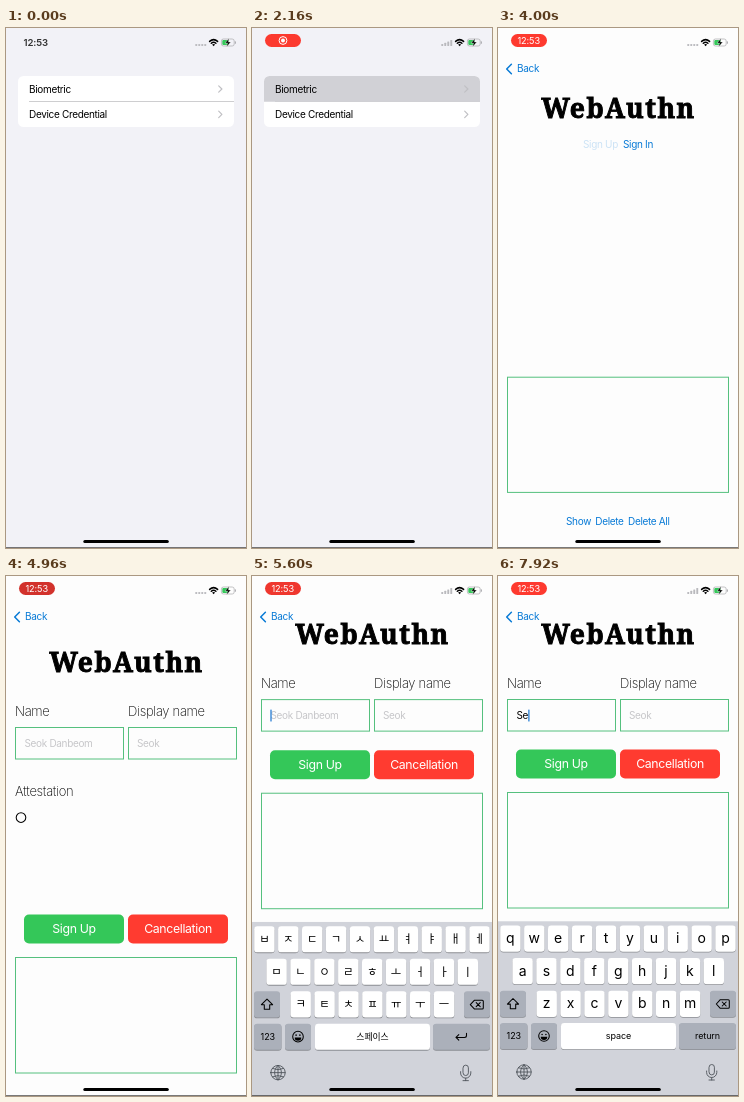
Write an HTML page that moves like this. It is 240 by 520 pixels and loops after 8000 ms.

```html
<!DOCTYPE html>
<html lang="en">
<head>
<meta charset="utf-8">
<title>WebAuthn demo</title>
<style>
html, body { margin: 0; width: 100%; height: 100%; overflow: hidden; background: #f2f2f7; }
svg { display: block; width: 240px; height: 520px; overflow: hidden; }
text { font: 10px Inter, "Noto Sans", sans-serif; letter-spacing: -.33px; white-space: pre; }
.blue { fill: #087ad6; }
.hint { fill: #c6c6c9; }
.label { font-size: 13px; font-weight: 200; letter-spacing: -.3px; }
.btn { font-size: 12.3px; letter-spacing: -.35px; fill: #fff; }
.title { font: 900 26.5px "Noto Serif", serif; letter-spacing: 1.5px; stroke: #000; stroke-width: .9; }
.ko { font: 500 11.4px "Noto Sans CJK KR", "Noto Sans CJK", sans-serif; letter-spacing: 0; }
.en { font-size: 14px; letter-spacing: 0; }
.small { font-size: 9px; letter-spacing: -.1px; }
.line { fill: none; stroke: #000; stroke-width: 1.05; stroke-linecap: round; stroke-linejoin: round; }
.green { fill: #fdfdfd; stroke: #55c07e; stroke-width: 1; }
</style>
</head>
<body>
<svg id="stage" viewBox="0 0 240 520" xmlns="http://www.w3.org/2000/svg"></svg>
<script>
const LOOP = 8000;
const PUSH = 2200, FORM = 4240, KEYS = 5115, ENGLISH = 6640, TYPE_1 = 7280, TYPE_2 = 7760;
const FORM_RISE = 28, LOWER_RISE = 165, KEYBOARD_RISE = 175;
const FULL_NAME = 'Seok Danbeom', SHORT_NAME = 'Seok', TYPED = 'Se';

const rect = (x, y, w, h, fill, r = 0, more = '') =>
  `<rect x="${x}" y="${y}" width="${w}" height="${h}" rx="${r}" fill="${fill}" ${more}/>`;
const text = (x, y, s, cls = '', more = '') =>
  `<text x="${x}" y="${y}" class="${cls}" ${more}>${s}</text>`;
const mid = (x, y, s, cls = '', more = '') => text(x, y, s, cls, `text-anchor="middle" ${more}`);
const path = (d, more = '') => `<path class="line" d="${d}" ${more}/>`;
const group = (id, body, more = '') => `<g id="${id}" ${more}>${body}</g>`;
const frame = (x, y, w, h) => `<rect class="green" x="${x}" y="${y}" width="${w}" height="${h}"/>`;

function listView() {
  const chevron = y => path(`M212.7 ${y - 3.2}l3.2 3.2l-3.2 3.2`, 'style="stroke:#c0c0c4;stroke-width:1.2"');
  return rect(0, 0, 240, 520, '#f2f2f7') +
    rect(12, 48, 216, 51, '#fff', 5.5) +
    rect(23, 73, 205, .8, '#c2c2c5') +
    group('pressed', '<path d="M12 73.8V53.5a5.5 5.5 0 0 1 5.5-5.5h205a5.5 5.5 0 0 1 5.5 5.5v20.3z" fill="#d1d1d6"/>') +
    text(23, 64.6, 'Biometric') + text(23, 90, 'Device Credential') +
    chevron(61) + chevron(86.4) +
    rect(0, 0, 240, 520, '#000', 0, 'id="dim"');
}

function homeView() {
  return group('signUp', text(85, 120, 'Sign Up', 'blue')) +
    text(125, 120, 'Sign In', 'blue') +
    frame(9.5, 349.2, 221, 115.2) +
    text(68, 497, 'Show', 'blue') + text(97.3, 497, 'Delete', 'blue') + text(130, 497, 'Delete All', 'blue');
}

function formView() {
  const fields = text(9, 111.8, 'Name', 'label') + text(122, 111.8, 'Display name', 'label') +
    frame(9.5, 123.5, 108, 31.5) + frame(122.5, 123.5, 108, 31.5) +
    text(18.5, 142.6, FULL_NAME, 'hint', 'id="hint"') +
    text(18.5, 142.6, '', '', 'id="typed"') +
    text(131, 142.6, SHORT_NAME, 'hint') +
    rect(18.4, 133.5, 1.2, 12, '#1673d1', .5, 'id="caret"') +
    text(9, 192, 'Attestation', 'label') +
    '<circle cx="15" cy="213.6" r="4.8" class="line"/>';
  const lower = rect(18, 173.5, 100, 29, '#34c759', 5) + mid(68, 192.4, 'Sign Up', 'btn') +
    rect(122, 173.5, 100, 29, '#ff3b30', 5) + mid(172, 192.4, 'Cancellation', 'btn') +
    frame(9.5, 216.5, 221, 115.5);
  return `<clipPath id="clip"><rect id="clipBox" x="0" width="240"/></clipPath>` +
    `<g clip-path="url(#clip)">${group('fields', fields)}</g>` + group('lower', lower);
}

const ROW_Y = [349.5, 382, 414.7, 447];
const ROW_X = [12.4, 24.6, 48.7];
const keyX = (row, i) => ROW_X[row] + i * 23.9;

function key(x, y, w, fill = '#fff', h = 26.2) {
  return rect(x, y + .8, w, h, '#8b8d92', 3.2) + rect(x, y, w, h, fill, 3.2);
}

function letters(rows, cls) {
  return rows.map((row, r) => [...row].map((c, i) =>
    mid(keyX(r, i), ROW_Y[r] + (cls === 'ko' ? 17 : 17.6), c, cls)).join('')).join('');
}

function keyboard() {
  const grey = '#abb0ba';
  const latin = ['qwertyuiop', 'asdfghjkl', 'zxcvbnm'];
  let s = rect(0, 345.3, 240, 260, '#d1d3da');
  latin.forEach((row, r) => [...row].forEach((c, i) => s += key(keyX(r, i) - 10.2, ROW_Y[r], 20.4)));
  const arrow = 'M15 422.5l-5.6 5.6h2.9v4.6h5.4v-4.6h2.9z';
  s += key(2, ROW_Y[2], 26, grey) + path(arrow) +
    group('shiftOn', rect(2, ROW_Y[2], 26, 26.2, '#fff', 3.2) + path(arrow, 'style="fill:#000"'));
  s += key(212, ROW_Y[2], 26, grey) +
    path('M218.3 428l4-4.3h8a1 1 0 0 1 1 1v6.6a1 1 0 0 1-1 1h-8zM224.2 426l4 4m0-4l-4 4');
  s += key(2, ROW_Y[3], 27.5, grey) + mid(15.8, 463.4, '123', 'small') +
    key(33, ROW_Y[3], 26, grey) +
    '<circle class="line" cx="46" cy="460" r="5.3"/><circle cx="44.1" cy="458.5" r=".8"/><circle cx="47.9" cy="458.5" r=".8"/>' +
    '<path d="M42.7 460.8h6.6a3.3 3.2 0 0 1-6.6 0z"/>' +
    key(63, ROW_Y[3], 115, '#fff') + key(181, ROW_Y[3], 57, grey);
  s += group('korean', letters(['ㅂㅈㄷㄱㅅㅛㅕㅑㅐㅔ', 'ㅁㄴㅇㄹㅎㅗㅓㅏㅣ', 'ㅋㅌㅊㅍㅠㅜㅡ'], 'ko') +
    mid(120.5, 463.3, '스페이스', 'ko', 'style="font-size:8.8px"') +
    path('M214.5 456.6v2.2a2 2 0 0 1-2 2h-8.5m2.8-2.8l-2.8 2.8l2.8 2.8'));
  s += group('english', group('lowerCase', letters(latin, 'en')) +
    group('upperCase', letters(latin.map(r => r.toUpperCase()), 'en')) +
    mid(120.5, 463, 'space', 'small') + mid(209.5, 463, 'return', 'small'));
  const soft = 'style="stroke:#50555c;stroke-width:.9"';
  s += path('M18.8 496a7.2 7.2 0 1 0 14.4 0a7.2 7.2 0 1 0-14.4 0zM26 488.8v14.4M18.8 496h14.4' +
    'M26 488.8c-4.6 4-4.6 10.4 0 14.4M26 488.8c4.6 4 4.6 10.4 0 14.4M20.4 491.8q5.6 2.6 11.2 0M20.4 500.2q5.6-2.6 11.2 0', soft) +
    path('M211 491.2a2.7 2.7 0 0 1 5.4 0v5a2.7 2.7 0 0 1-5.4 0zM208.6 495v1.4a5.1 5.1 0 0 0 10.2 0V495M213.7 501.6v2.4M211 504h5.4', soft);
  return s + popup('popup1', keyX(1, 1), ROW_Y[1], TYPED[0]) + popup('popup2', keyX(0, 2), ROW_Y[0], TYPED[1]);
}

function popup(id, x, y, c) {
  const shape = `M${x - 10.2} ${y + 23}v-20q0-4-3-6t-3-6v-18q0-5 5-5h22.4q5 0 5 5v18q0 4-3 6t-3 6v20q0 3.2-3.2 3.2h-14q-3.2 0-3.2-3.2z`;
  return group(id, `<path d="${shape}" fill="#fff" stroke="#b4b6bb" stroke-width=".5"/>` +
    mid(x, y - 11, c, 'en', 'style="font-size:21px"'));
}

function statusBar() {
  let cell = '', dots = '';
  for (let i = 0; i < 4; i++) {
    cell += rect(189.3 + i * 3, 16 - i * 1.3, 1.9, 2 + i * 1.3, '#b9b9bd', .5);
    dots += rect(189.3 + i * 3, 16, 1.9, 2, '#bcbcc0', .6);
  }
  const wifi = path('M203.6 13.4q4-3.6 8 0M205.3 15.3q2.3-2 4.6 0', 'style="stroke-width:1.5"') +
    '<path d="M206.1 16.6q1.5-1.1 3 0l-1.5 1.7z"/>';
  const battery = rect(215.4, 11, 12.8, 7, 'none', 2, 'stroke="#a9a9ad" stroke-width=".7"') +
    rect(216.3, 11.9, 6.5, 5.2, '#34c759', 1) + rect(228.9, 13.3, 1, 2.5, '#a9a9ad', .5) +
    '<path d="M223.2 10.2l-4.2 4.9h2.5l-1 3.9l4.3-5.1h-2.5z" stroke="#fff" stroke-width=".4"/>';
  return text(17.5, 18, '12:53', '', 'id="clock" style="font-size:9.6px;font-weight:600;fill:#333;letter-spacing:-.1px"') +
    group('pill', rect(13, 6, 36, 13, '#ff3b30', 6.5, 'id="pillBg"') +
      group('recIcon', '<circle cx="31" cy="12.5" r="3.9" fill="none" stroke="#fff" stroke-width="1"/><circle cx="31" cy="12.5" r="2" fill="#fff"/>') +
      mid(30.7, 15.8, '12:53', '', 'id="pillTime" fill="#fff" style="font-size:9.2px;letter-spacing:-.1px"')) +
    group('dots', dots) + group('cell', cell) + wifi + battery;
}

document.getElementById('stage').innerHTML =
  group('list', listView()) +
  group('screen', rect(0, 0, 240, 520, '#fdfdfd') + group('home', homeView()) + group('form', formView()) +
    mid(120.7, 89.6, 'WebAuthn', 'title', 'id="title"')) +
  group('back', path('M13.4 36.2l-4.7 4.8l4.7 4.8', 'style="stroke:#087ad6;stroke-width:1.5"') + text(19, 44.4, 'Back', 'blue')) +
  group('keyboard', keyboard()) +
  group('status', statusBar()) +
  rect(77.3, 512, 85.5, 3, '#000', 1.5) + rect(0, 519.4, 240, .6, '#222');

const el = {};
document.querySelectorAll('[id]').forEach(n => el[n.id] = n);

const clamp = v => Math.max(0, Math.min(1, v));
const ramp = (t, start, length) => clamp((t - start) / length);
// Share of the way still to go in a critically damped move.
const rest = (t, start, speed = 16) => {
  const x = Math.max(0, t - start) / 1000 * speed;
  return (1 + x) * Math.exp(-x);
};
const show = (name, on) => el[name].style.display = on ? '' : 'none';
const move = (name, x, y) => el[name].setAttribute('transform', `translate(${x.toFixed(2)} ${y.toFixed(2)})`);
const fade = (name, v) => el[name].setAttribute('opacity', v.toFixed(3));

function drawStatus(t) {
  fade('clock', 1 - ramp(t, 480, 160));
  fade('pill', ramp(t, 480, 160));
  const glow = .5 + .5 * Math.cos(t / 1000 * Math.PI);
  el.pillBg.setAttribute('fill', `rgb(${210 + 45 * glow | 0},${50 + 9 * glow | 0},${44 + 4 * glow | 0})`);
  const time = ramp(t, 3040, 200);
  fade('recIcon', 1 - time);
  fade('pillTime', time);
  const bars = (t > 1900 && t < 2450) || t > 5400;
  show('cell', bars);
  show('dots', !bars);
}

function drawPush(t) {
  const left = rest(t, PUSH, 15.5);
  show('list', left > .001);
  show('screen', t >= PUSH);
  move('screen', 240 * left, 0);
  move('list', -72 * (1 - left), 0);
  fade('dim', .1 * (1 - left));
  fade('back', ramp(t, PUSH + 80, 240));
  show('pressed', t >= 1740);
  const touch = ramp(t, 3860, 60) - ramp(t, 4140, 100);
  fade('signUp', 1 - .8 * touch);
}

function drawForm(t) {
  const left = rest(t, KEYS + 12);
  const drop = FORM_RISE * left;
  show('home', t < FORM);
  show('form', t >= FORM);
  move('title', 0, t < FORM ? 0 : drop - 22);
  move('fields', 0, drop);
  move('lower', 0, LOWER_RISE * left);
  const top = 95 + drop;
  el.clipBox.setAttribute('y', top);
  el.clipBox.setAttribute('height', 169 + LOWER_RISE * left - top);

  const count = (t >= TYPE_1) + (t >= TYPE_2);
  el.typed.textContent = TYPED.slice(0, count);
  show('hint', !count);
  const since = t - (count === 2 ? TYPE_2 : count ? TYPE_1 : KEYS);
  const phase = since % 1000;
  show('caret', since >= 0);
  fade('caret', phase < 500 ? 1 : 1 - ramp(phase, 500, 120) + ramp(phase, 900, 100));
  el.caret.setAttribute('x', 18.4 + (count ? el.typed.getComputedTextLength() + .3 : 0));
}

function drawKeyboard(t) {
  show('keyboard', t >= KEYS);
  move('keyboard', 0, KEYBOARD_RISE * rest(t, KEYS));
  const english = t >= ENGLISH, caps = english && t < TYPE_1 + 60;
  show('korean', !english);
  show('english', english);
  show('upperCase', caps);
  show('lowerCase', !caps);
  show('shiftOn', caps);
  show('popup1', t >= TYPE_1 - 60 && t < TYPE_1 + 60);
  show('popup2', t >= TYPE_2 - 60 && t < TYPE_2 + 60);
}

function draw(now) {
  const t = now % LOOP;
  drawStatus(t);
  drawPush(t);
  drawForm(t);
  drawKeyboard(t);
}

function tick() {
  draw(performance.now());
  requestAnimationFrame(tick);
}
tick();
</script>
</body>
</html>
```
